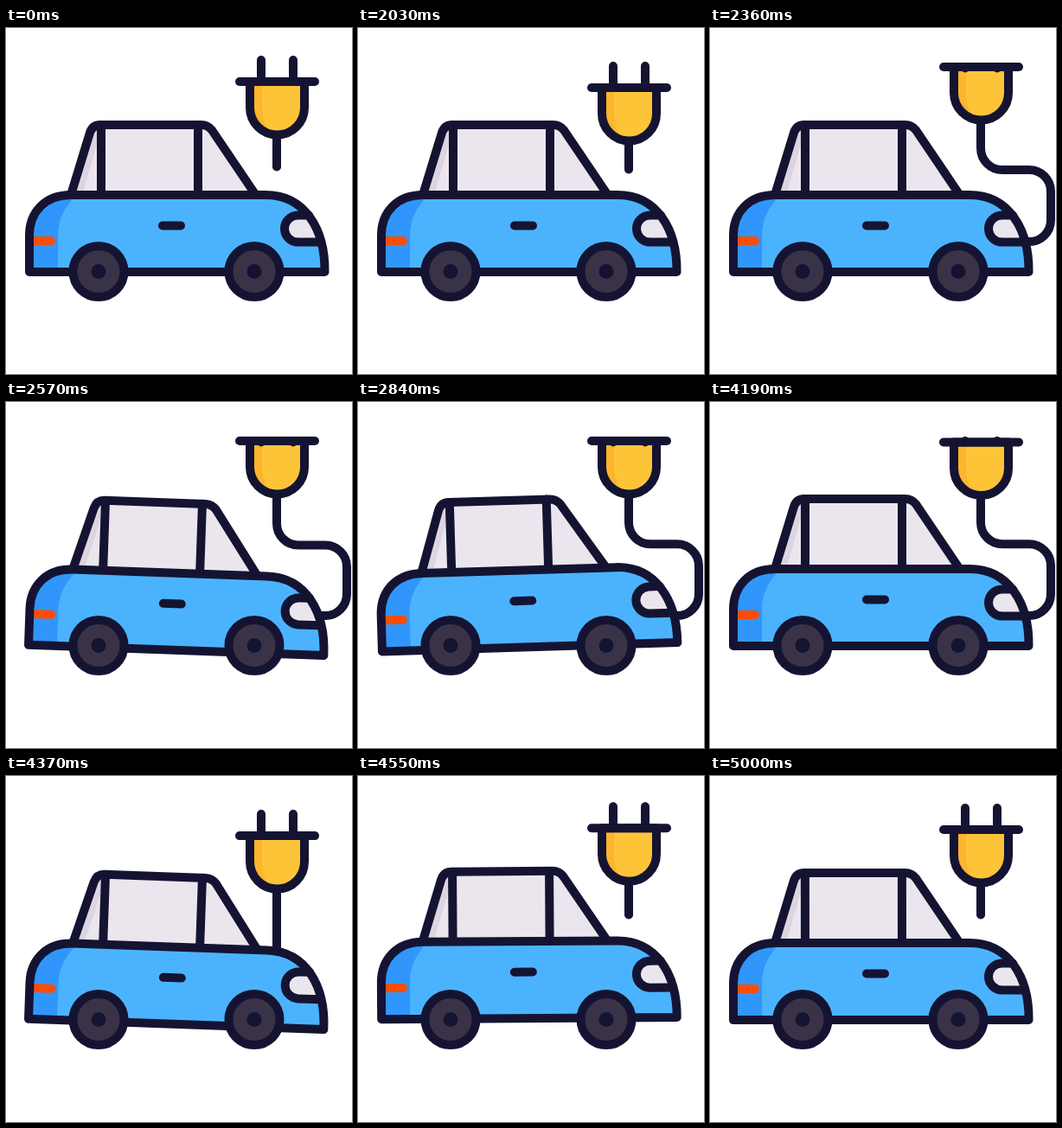
An HTML page for the animation above (5.03 s loop, 400 by 400 pixels).

```html
<!DOCTYPE html>
<html lang="en">
<head>
<meta charset="utf-8">
<title>Electric car charging</title>
<style>
  html, body { margin: 0; height: 100%; overflow: hidden; background: #fff; }
  svg { display: block; width: 100vw; height: 100vh; }
  .line { fill: none; stroke: #141432; stroke-width: 10; stroke-linecap: round; stroke-linejoin: round; }
</style>
</head>
<body>
<svg viewBox="0 0 400 400">
  <defs>
    <path id="shell" d="M282 0V30a31.5 31.5 0 0 0 63 0V0Z"/>
    <path id="body" d="M27 282V240C27 212 46 193 75 193H300C345 193 369 232 368.500 282Z"/>
    <path id="cabin" d="M75 193L97 121Q100 112 109 112H226Q233 112 238 118L288 192"/>
    <g id="wheel">
      <circle class="line" style="fill:#3a3347" cx="107" cy="281.500" r="29.500"/>
      <circle fill="#141432" cx="107" cy="281.500" r="8.500"/>
    </g>
  </defs>
  <path id="cable" class="line"/>
  <g id="plug">
    <use href="#shell" fill="#fec438"/>
    <path fill="#fdb42e" d="M282 0H296V30Q296 50 307 61A31.5 31.5 0 0 1 282 30Z"/>
    <use href="#shell" class="line"/>
    <path class="line" d="M270 0H357"/>
    <path id="prongs" class="line"/>
  </g>
  <g id="car">
    <use href="#cabin" fill="#ebe6ed"/>
    <path fill="#ddd4e1" d="M75 193L97 121Q99 114 105 113L84 193Z"/>
    <path fill="#ddd4e1" d="M84 193L105 113H110V118L88 193Z"/>
    <use href="#cabin" class="line"/>
    <path class="line" d="M110 112V193M222 112V193"/>
    <use href="#body" fill="#4bb3fd"/>
    <path fill="#3096fc" d="M27 282V240C27 212 46 193 75 193H82C68 205 60 222 60 240V282Z"/>
    <path class="line" style="stroke:#fc4c05" d="M30 246H52"/>
    <path class="line" style="fill:#ebe6ed" d="M350 216.500H337.500a15.500 15.500 0 0 0 0 31H363"/>
    <use href="#body" class="line"/>
    <path class="line" d="M181 228.500H202"/>
  </g>
  <use href="#wheel"/>
  <use href="#wheel" x="180"/>
</svg>
<script>
const LOOP = 5030, STEP = 30;
const PLUG_IN = 2030, PULL_OUT = 4175, JOLT_DELAY = 360;
const [cable, plug, prongs, car] = ['cable', 'plug', 'prongs', 'car'].map(id => document.getElementById(id));

// 0 before start, 1 after end, with a sine ease between.
function ease(t, start, end) {
  const p = Math.min(1, Math.max(0, (t - start) / (end - start)));
  return (1 - Math.cos(Math.PI * p)) / 2;
}

// Height of the plug's bar: dip and rise when plugging in, spring back when pulled out.
function barHeight(t) {
  if (t < PLUG_IN) return 62;
  if (t < PULL_OUT) return 69 - 24 * ease(t, PLUG_IN, 2300);
  const u = t - PULL_OUT;
  return 62 - 17 * Math.cos(Math.PI * u / 175) * Math.max(0, 1 - u / 540) ** 1.8;
}

// The car rocks forward, then back, and settles.
function rock(u) {
  return {
    tilt: 2.05 * (ease(u, 0, 170) - 2 * ease(u, 170, 510) + ease(u, 510, 840)),
    bounce: 5 * ease(u, 0, 165) - 7 * ease(u, 165, 350) + 3.7 * ease(u, 350, 480) - 1.7 * ease(u, 480, 720),
  };
}

function draw(t) {
  const bar = barHeight(t);
  const plugged = ease(t, 2090, 2300) - ease(t, 4160, 4300);
  const tip = 26.5 * plugged - 25;
  plug.setAttribute('transform', `translate(0 ${bar})`);
  prongs.setAttribute('d', `M295 0V${tip}M332 0V${tip}`);

  const { tilt, bounce } = rock(t < PULL_OUT ? t - PLUG_IN - JOLT_DELAY : t - PULL_OUT - 15);
  car.setAttribute('transform', `translate(0 ${bounce}) rotate(${tilt} 197 252)`);

  const bend = 139 + (bar - 45) ** 2 / 10 + bounce * 0.3;
  cable.setAttribute('d', `M313 ${bar + 61}V${bend}a25 25 0 0 0 25 25H369a25 25 0 0 1 25 25V222a25 25 0 0 1-25 25H362`);
  const drawn = ease(t, 2000, 2400) - ease(t, 4190, 4480);
  const stub = 99.5 - bar;
  cable.setAttribute('stroke-dasharray', `${stub + (cable.getTotalLength() - stub) * drawn} 999`);
}

function tick() {
  const t = performance.now() % LOOP;
  draw(Math.floor((t - 20) / STEP) * STEP + 20);
  requestAnimationFrame(tick);
}
tick();
</script>
</body>
</html>
```
